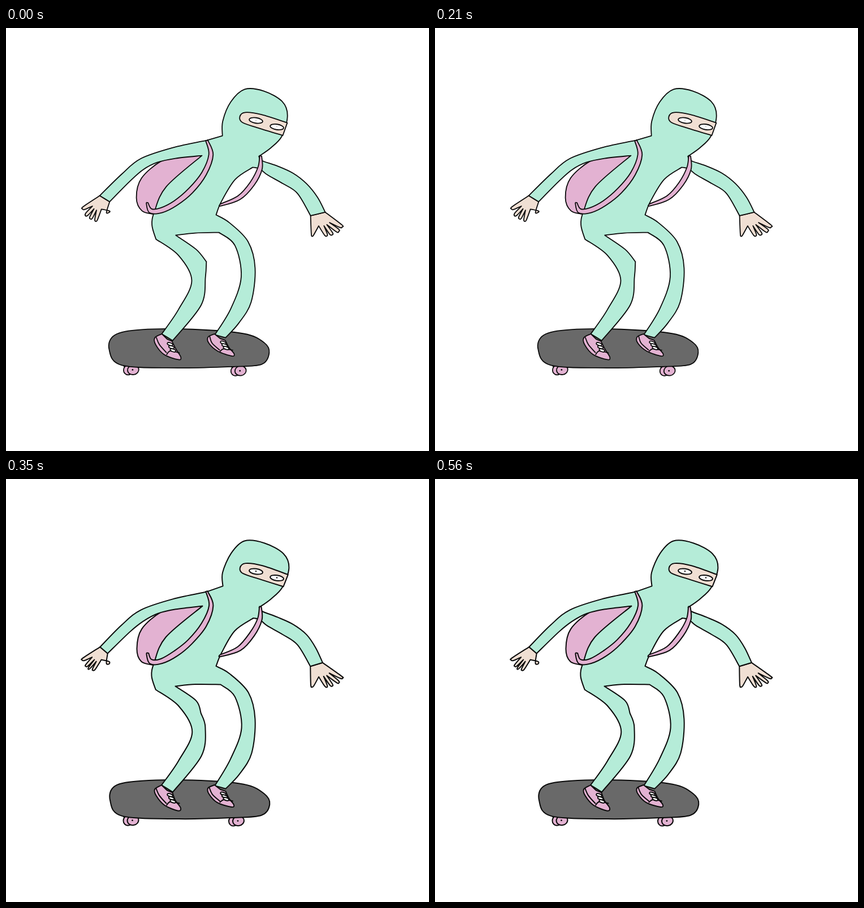
Recreate the animation shown at these times as an HTML page with a canvas. Size 748 px wide and 748 px high, loop 630 ms.

```html
<!DOCTYPE html>
<html lang="en">
<head>
<meta charset="utf-8">
<title>Skater</title>
<style>
html, body { margin: 0; width: 100%; height: 100%; overflow: hidden; background: #fff; }
canvas { display: block; }
</style>
</head>
<body>
<canvas id="stage" width="748" height="748"></canvas>
<script>
const ctx = document.getElementById('stage').getContext('2d');
const MINT = '#b5ecd8', PINK = '#e3b2d2', GREY = '#696969', SKIN = '#f0dfd3', WHITE = '#fff', INK = '#0a0a0a';
const HOLD = 70, WOBBLE = .6;

// Each redraw bends the same figure: a nudge pulls the area around x, y by dx, dy.
const nudge = (x, y, reach, dx, dy) => ({ x, y, reach, dx, dy });
const redraws = [
  { line: 1.8, pupil: .5, nudges: [] },
  { line: 1.7, pupil: 1.2, nudges: [
    nudge(231, 300, 22, -5, -1), nudge(134, 320, 16, -4, -2),
    nudge(352, 412, 20, -9, 0), nudge(326, 440, 22, -5, 0),
    nudge(376, 361, 12, 8, 5), nudge(500, 145, 30, -2, 0),
    nudge(466, 570, 35, -4, -1), nudge(222, 604, 14, 7, 0)
  ] },
  { line: 2, pupil: 1.2, nudges: [
    nudge(490, 130, 45, 3, 2), nudge(354, 412, 18, -10, 0),
    nudge(376, 361, 12, 3, 2), nudge(158, 342, 13, -5, -3),
    nudge(183, 307, 12, -3, 2), nudge(562, 315, 22, -6, -1),
    nudge(182, 568, 30, 2, 0), nudge(410, 606, 16, -4, -1)
  ] }
];

// Key points "x,y"; a bar marks a sharp corner at the point before it.
const HEAD = '383,190 383,165 398,131 422,109 456,112 488,130 498,155 488,191 468,212 447,227';
const ARM_R = '453,234 480,244 508,257 532,275 551,299 564,326 | 539,332 | 516,293 490,275 462,260 449,249 437,246';
const LEG_R = '405,268 381,307 371,331 | 395,344 428,378 441,425 434,485 412,522 388,548 | 369,542 | 397,496 416,440 405,385 376,361';
const LEG_L = '335,363 300,366 | 337,392 354,414 | 353,440 345,490 295,553 | 275,541 | 305,498 329,447 305,402 265,373';
const ARM_L = '258,348 262,325 283,280 347,225 | 300,230 268,238 243,251 220,270 183,307 | 166,297 | 205,258 238,231 295,212 355,199 | 383,190';
const BODY = [HEAD, ARM_R, LEG_R, LEG_L, ARM_L].join('|');
const PACK = '350,222 | 310,224 275,235 240,265 231,300 240,323 262,329';
const SLIT = '490,190 450,178 419,167 414,157 423,149 452,153 497,168';
const BOARD = '182,568 192,543 240,534 330,533 420,540 457,556 466,575 452,595 400,599 305,601 205,596';
const STRAP_L = '355,199 363,224 350,258 326,288 300,309 275,322 256,323 250,309';
const STRAP_R = '450,226 449,248 435,275 412,300 379,313';
const SHOE = '0,0 | -12,7 -10,19 5,36 30,46 34,41 25,27 19,13 | 10,9';
const SEAM = '-9,6 -4,19 9,33';
const TOE = '9,36 16,30 32,33';

const read = text => text.trim().split(/\s+/).map(p => p.split(',').map(Number));
const readRuns = text => text.split('|').map(read);
const mix = (a, b, t) => [a[0] + (b[0] - a[0]) * t, a[1] + (b[1] - a[1]) * t];

let pose = 0;

function noise(x, y, salt) {
  const v = Math.sin(x * 12.9898 + y * 78.233 + salt * 37.719) * 43758.5453;
  return (v - Math.floor(v)) * 2 - 1;
}

function warp([x, y]) {
  let px = x + WOBBLE * noise(x, y, pose), py = y + WOBBLE * noise(y, x, pose + 3);
  for (const n of redraws[pose].nudges) {
    const pull = Math.exp(-((x - n.x) ** 2 + (y - n.y) ** 2) / n.reach ** 2);
    px += n.dx * pull;
    py += n.dy * pull;
  }
  return [px, py];
}

// Smooth curve through warped runs; runs meet in sharp corners.
function curve(runs, loop = false) {
  const path = new Path2D();
  let last = null;
  for (const run of runs) {
    const pts = run.map(warp);
    if (last) pts.unshift(last);
    else path.moveTo(...pts[0]);
    const n = pts.length;
    const at = i => loop ? pts[(i + n) % n] : pts[Math.max(0, Math.min(n - 1, i))];
    for (let i = 0; i < (loop ? n : n - 1); i++) {
      const a = at(i - 1), b = at(i), c = at(i + 1), d = at(i + 2);
      path.bezierCurveTo(
        b[0] + (c[0] - a[0]) / 6, b[1] + (c[1] - a[1]) / 6,
        c[0] - (d[0] - b[0]) / 6, c[1] - (d[1] - b[1]) / 6, c[0], c[1]);
    }
    last = pts[n - 1];
  }
  return path;
}

function shape(path, fill) {
  path.closePath();
  ctx.fillStyle = fill;
  ctx.fill(path);
  ctx.stroke(path);
}

function oval(x, y, rx, ry, turn, fill) {
  const path = new Path2D();
  path.ellipse(x, y, rx, ry, turn, 0, Math.PI * 2);
  shape(path, fill);
}

function dot(x, y, r) {
  ctx.fillStyle = INK;
  ctx.beginPath();
  ctx.arc(x, y, r, 0, Math.PI * 2);
  ctx.fill();
}

// Band along a centre line, thinner towards both ends.
function strap(text, half) {
  const mid = read(text), end = mid.length - 1;
  const side = sign => mid.map(([x, y], i) => {
    const a = mid[Math.max(0, i - 1)], b = mid[Math.min(end, i + 1)];
    const dx = b[0] - a[0], dy = b[1] - a[1], len = Math.hypot(dx, dy);
    const w = sign * half * (.35 + .65 * Math.sqrt(Math.abs(Math.sin(Math.PI * i / end))));
    return [x - dy / len * w, y + dx / len * w];
  });
  shape(curve([side(1), side(-1).reverse()]), PINK);
}

// Fingers fan out from the palm, with notches halfway between neighbouring tips.
function hand(from, palm, tips, to) {
  const runs = [[from]];
  tips.forEach((tip, i) => {
    const dx = tip[0] - palm[0], dy = tip[1] - palm[1], len = Math.hypot(dx, dy);
    const side = w => [tip[0] + dy / len * w - dx / len * 3, tip[1] - dx / len * w - dy / len * 3];
    const turn = Math.sign((from[0] - palm[0]) * dy - (from[1] - palm[1]) * dx);
    const next = tips[i + 1];
    runs.push([side(turn * 2.6), tip, side(turn * -2.6), next ? mix(palm, mix(tip, next, .5), .5) : to]);
  });
  shape(curve(runs), SKIN);
}

function wheels(x, y) {
  const [cx, cy] = warp([x, y]);
  ctx.beginPath();
  for (const dx of [-17, -12]) {
    ctx.moveTo(x + dx, 597);
    ctx.lineTo(cx - 12, cy);
  }
  ctx.stroke();
  oval(cx - 9, cy + .5, 8, 8.5, 0, PINK);
  oval(cx, cy, 10, 8.5, -.15, PINK);
  dot(cx - 1, cy, 1.4);
}

function shoe(x, y, tall) {
  const place = text => readRuns(text).map(run => run.map(p => [x + p[0], y + p[1] * tall]));
  shape(curve(place(SHOE)), PINK);
  ctx.stroke(curve(place(SEAM)));
  ctx.stroke(curve(place(TOE)));
  for (let i = 0; i < 3; i++) oval(x + 15 + i * 2.6, y + (18 + i * 5.5) * tall, 5, 2.4, .35, WHITE);
}

function eye(x, y) {
  oval(x, y, 12, 4.8, .15, WHITE);
  dot(x, y - .5, redraws[pose].pupil);
}

function draw() {
  ctx.fillStyle = WHITE;
  ctx.fillRect(0, 0, 748, 748);
  ctx.strokeStyle = INK;
  ctx.lineWidth = redraws[pose].line;
  ctx.lineJoin = ctx.lineCap = 'round';

  wheels(225, 604);
  wheels(415, 606);
  shape(curve(readRuns(BOARD), true), GREY);
  shape(curve(readRuns(PACK)), PINK);
  hand([166, 297], [167, 305], read('135,320 141,332 149,338 159,342 182,327'), [183, 307]);
  hand([539, 332], [552, 332], read('541,368 567,368 577,366 589,360 595,352'), [564, 326]);
  shape(curve(readRuns(BODY)), MINT);
  strap(STRAP_L, 5);
  strap(STRAP_R, 4.5);
  shape(curve(readRuns(SLIT)), SKIN);
  eye(442, 163.5);
  eye(479, 175);
  shoe(275, 541, 1);
  shoe(369, 541, .86);
}

const start = performance.now();
let shown = -1;
function tick() {
  pose = Math.floor((performance.now() - start) / HOLD) % redraws.length;
  if (pose !== shown) draw();
  shown = pose;
  requestAnimationFrame(tick);
}
tick();
</script>
</body>
</html>
```
